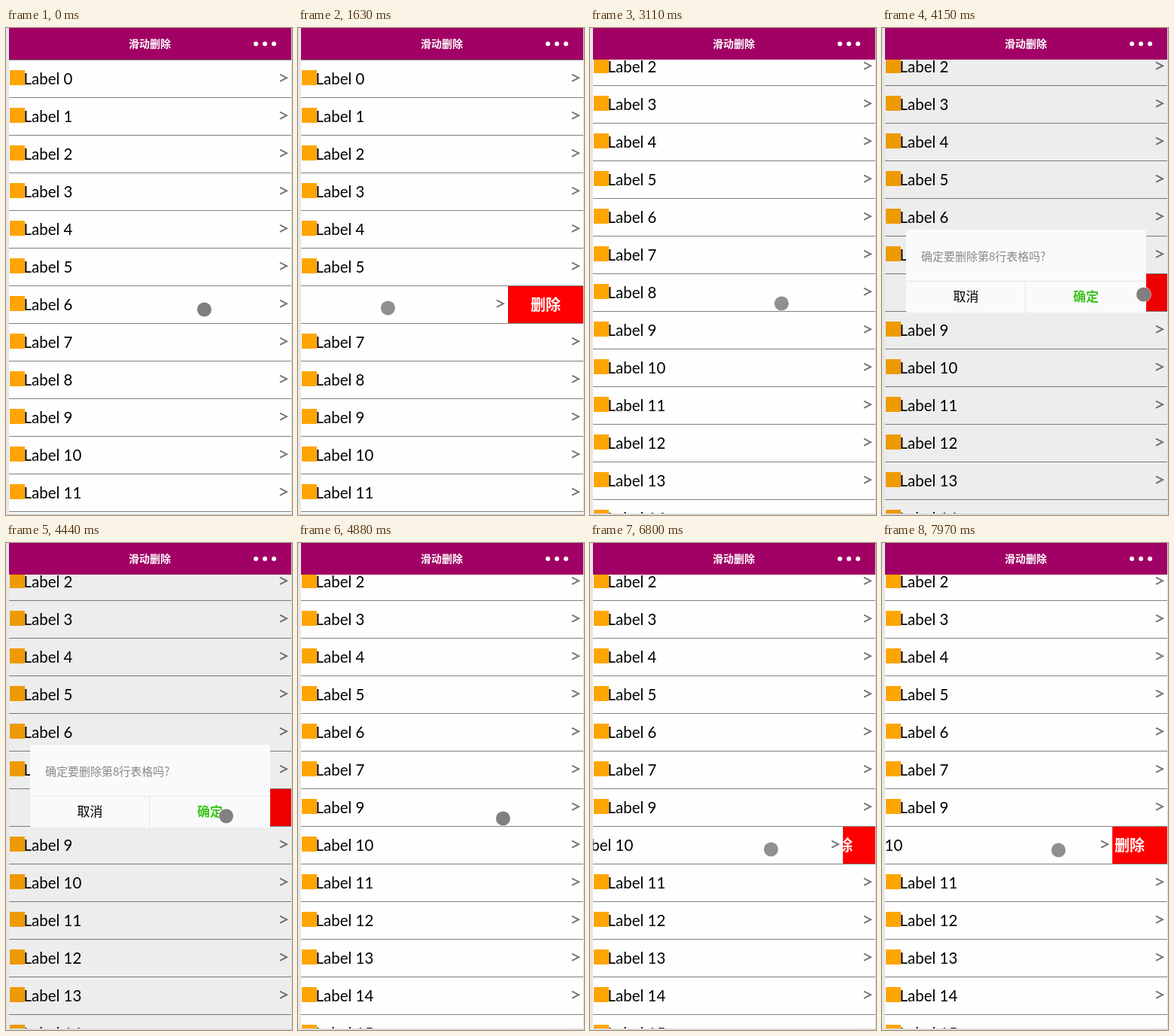
An HTML page that plays this animation: 380 px wide and 647 px high, repeating every 8 s.

```html
<!DOCTYPE html>
<html lang="zh-CN">
<head>
<meta charset="utf-8">
<title>滑动删除</title>
<style>
  html, body { margin: 0; width: 100%; height: 100%; overflow: hidden; background: #fefefe; }
  svg { display: block; }
  text { font-family: "Noto Sans CJK SC", "Noto Sans CJK", sans-serif; }
  .label { font: 20.5px Lato, sans-serif; }
  .mid { text-anchor: middle; }
  .bold { font-weight: 700; fill: #fff; }
  .chevron { fill: none; stroke: #777; stroke-width: 2; }
  #dialog text { font-weight: 500; }
  #touch { stroke: #fff; stroke-opacity: .5; stroke-width: 2; paint-order: stroke; }
</style>
</head>
<body>
<svg width="380" height="647" viewBox="0 0 380 647">
  <clipPath id="page"><rect x="4" y="42" width="375" height="603"/></clipPath>
  <rect width="380" height="647" fill="#fefefe"/>
  <g clip-path="url(#page)">
    <g id="list"><rect x="4" y="42" width="375" height="1" fill="#808080"/></g>
    <rect id="mask" x="4" y="42" width="375" height="603" opacity=".065"/>
  </g>
  <rect x="4" width="375" height="42" fill="#a10064"/>
  <text class="mid bold" x="191" y="26" font-size="14">滑动删除</text>
  <g fill="#fff">
    <circle cx="332" cy="21" r="3"/><circle cx="344" cy="21" r="3"/><circle cx="356" cy="21" r="3"/>
  </g>
  <rect width="4" height="647" fill="#e7e7e7"/>
  <rect x="379" width="1" height="647" fill="#dedede"/>
  <rect x="4" y="645" width="376" height="2" fill="#dcdcdc"/>
  <g id="dialog">
    <rect x="32" y="268" width="319" height="110" rx="3" fill="#fafafc"/>
    <path d="M32 336.5H351M190.5 337V378" stroke="#e4e4e6"/>
    <text x="52" y="309" font-size="15" fill="#888">确定要删除第8行表格吗?</text>
    <text class="mid" x="111.5" y="363" font-size="17">取消</text>
    <text class="mid" x="271" y="363" font-size="17" style="font-weight:700" fill="#3cc51f">确定</text>
  </g>
  <circle id="touch" r="9.5"/>
</svg>
<script>
const LOOP = 8000, STEP = 147.8;
const ROW = 50, ROWS = 17, REMOVED = 8, BUTTON = 100;
const SCROLL_START = 1630, SCROLL_END = 2960;
const ASK = 3980, CONFIRM = 4720;
const $ = id => document.getElementById(id);

const ramp = (t, from, to) => Math.min(1, Math.max(0, (t - from) / (to - from)));
const smooth = k => k * k * (3 - 2 * k);
const easeOut = k => 1 - (1 - k) ** 3;
const glide = (t, from, to) => smooth(ramp(t, from, to));

// Resting points of the finger; it eases from each one to the next.
const stops = [
  { t: 0, x: 263.5, y: 374 },
  { t: 147, x: 269.5, y: 375 },
  { t: 450, x: 269.5, y: 375 },
  { t: 890, x: 118, y: 369 },
  { t: 1620, x: 119.5, y: 372 },
  { t: 2080, x: 133, y: 288 },
  { t: 3100, x: 254.5, y: 366 },
  { t: 3550, x: 135, y: 361 },
  { t: 3850, x: 347.5, y: 354 },
  { t: 4150, x: 347.5, y: 354 },
  { t: 4580, x: 272.5, y: 366 },
  { t: 4880, x: 272.5, y: 366 },
  { t: 5170, x: 283, y: 406 },
  { t: 6060, x: 213, y: 407 },
  { t: 6800, x: 240.5, y: 407 },
  { t: LOOP, x: 234.5, y: 408 }
];

function finger(t) {
  const i = stops.findIndex(stop => stop.t > t);
  const a = stops[i - 1], b = stops[i];
  const k = glide(t, a.t, b.t);
  return [a.x + (b.x - a.x) * k, a.y + (b.y - a.y) * k];
}

const within = (t, from, to) => t >= from && t < to;
const isPressed = t => within(t, 590, 800) || within(t, 1620, 2080)
  || within(t, 3100, 3500) || within(t, 5170, LOOP);

const scrolled = t => 116 * easeOut(ramp(t, SCROLL_START, SCROLL_END));

// How far each swiped row is pulled open; row 10 is let half way back once.
const pulls = {
  6: t => t < SCROLL_START ? BUTTON * glide(t, 450, 890) : 0,
  8: t => BUTTON * glide(t, 3100, 3550),
  10: t => {
    const back = Math.cos(Math.PI / 2 * Math.min(1, Math.abs(t - 6800) / 1170)) ** 2;
    return glide(t, 5170, 6060) * (73 - 30 * back);
  }
};

const rows = Array.from({ length: ROWS }, (_, i) => {
  const row = document.createElementNS("http://www.w3.org/2000/svg", "g");
  row.innerHTML = `
    <g>
      <rect x="279" width="${BUTTON}" height="49" fill="#f00"/>
      <text class="mid bold" x="329" y="31.5" font-size="20">删除</text>
    </g>
    <g>
      <rect x="4" width="375" height="49" fill="#fefefe"/>
      <rect x="5" y="13" width="20" height="20" fill="#ffa500"/>
      <text class="label" x="23.5" y="32">Label ${i}</text>
      <path class="chevron" d="M364 18.6L373 23.2L364 27.8"/>
    </g>
    <rect x="4" y="49" width="375" height="1" fill="#808080"/>`;
  $("list").append(row);
  return { row, button: row.children[0], panel: row.children[1] };
});

const show = (el, on) => el.setAttribute("visibility", on ? "visible" : "hidden");
const move = (el, x, y) => el.setAttribute("transform", `translate(${x} ${y})`);

function render(time) {
  const t = Math.floor((time + 11) / STEP) * STEP;
  const removed = t >= CONFIRM;
  const asking = within(t, ASK, CONFIRM);

  move($("list"), 0, -Math.round(scrolled(t)));
  rows.forEach(({ row, button, panel }, i) => {
    const pull = pulls[i] ? Math.round(pulls[i](t)) : 0;
    const slot = removed && i > REMOVED ? i - 1 : i;
    row.setAttribute("display", removed && i === REMOVED ? "none" : "inline");
    move(row, 0, 43 + slot * ROW);
    move(panel, -pull, 0);
    show(button, pull > 0);
  });

  show($("mask"), asking);
  show($("dialog"), asking);
  move($("touch"), ...finger(t));
  $("touch").setAttribute("fill", isPressed(t) ? "#909090" : "#808080");
}

const start = performance.now();
function tick() {
  render((performance.now() - start) % LOOP);
  requestAnimationFrame(tick);
}
tick();
</script>
</body>
</html>
```
